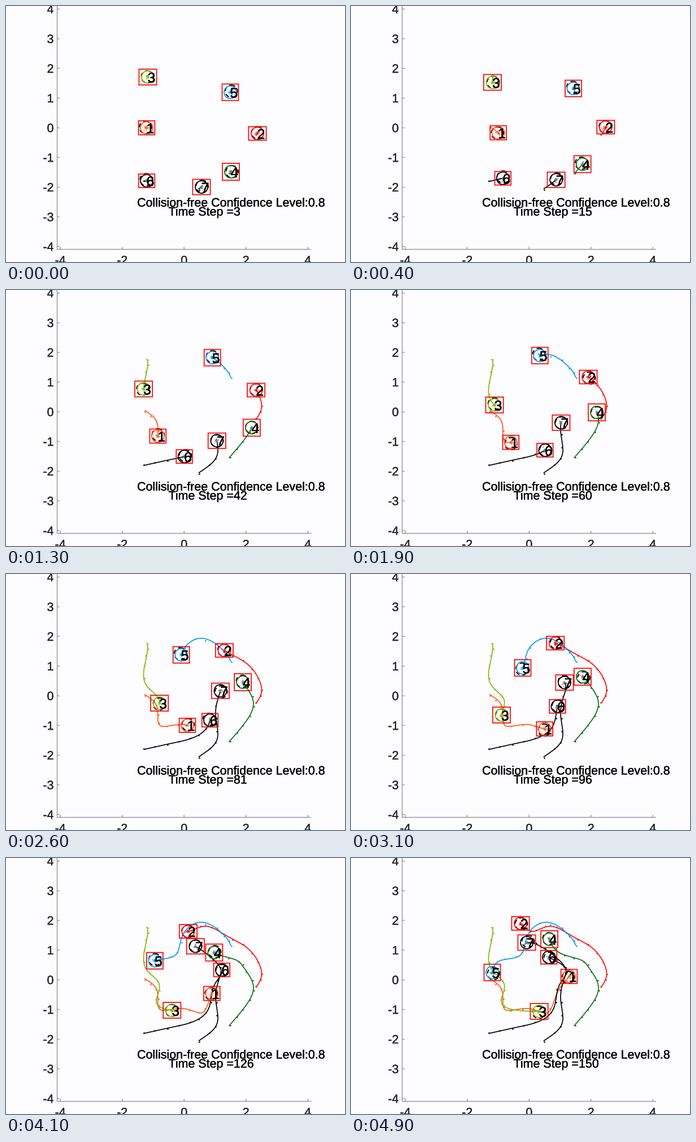
Write a matplotlib script that moves like this. It is 600 px wide and 454 px high and loops after 5 s.

```python
import numpy as np
import matplotlib.pyplot as plt
from matplotlib.animation import FuncAnimation
from matplotlib.patches import Circle, Rectangle
from matplotlib.patheffects import withStroke

W, H, DPI = 600, 454, 100
FRAMES, INTERVAL = 50, 100
PX = 72 / DPI
ORIGIN, UNIT = (315.2, 216), (54.75, 52.65)

plt.rcParams["font.family"] = "Liberation Sans"
plt.rcParams["text.hinting"] = "none"
fig = plt.figure(figsize=(W / DPI, H / DPI), dpi=DPI, facecolor="#fdfcfe")
ax = fig.add_axes([0, 0, 1, 1])
ax.set(xlim=(0, W), ylim=(H, 0))
ax.axis("off")


def write(x, y, text, size=21.45, color="black", **style):
    weight = withStroke(linewidth=0.35 * PX, foreground=color)
    return ax.text(x, y, text, fontsize=size * PX, color=color, va="baseline",
                   path_effects=[weight], **style)


def draw_axes():
    def rule(xs, ys):
        ax.plot(xs, ys, color="#777777", lw=PX, solid_capstyle="butt", snap=False)

    rule([90.5, 90.5], [0, 432])
    rule([90, 540], [431.5, 431.5])
    for v in range(-4, 5):
        y = ORIGIN[1] - UNIT[1] * v
        rule([90, 95], [y, y])
        write(84.5, y + 7.6, str(v), color="#262626", ha="right")
    for u in range(-4, 5, 2):
        x = ORIGIN[0] + UNIT[0] * u
        rule([x, x], [427, 432])
        write(x, 458, str(u), color="#262626", ha="center")


def spline_slopes(points):
    """Slopes of the natural cubic spline through evenly timed points."""
    n = len(points)
    system = 4 * np.eye(n) + np.eye(n, k=1) + np.eye(n, k=-1)
    system[0, 0] = system[-1, -1] = 2
    padded = np.pad(points, ((1, 1), (0, 0)), mode="edge")
    return np.linalg.solve(system, 3 * (padded[2:] - padded[:-2]))


class Robot:
    def __init__(self, label, color, half, route):
        self.label, self.half = label, half
        self.route = np.array(route, float)
        self.slopes = spline_slopes(self.route)

        rng = np.random.default_rng(label)
        self.dot_times = np.arange(-1, FRAMES, 4)
        self.dots = self.at(self.dot_times)
        self.dots += rng.uniform(-2.2, 2.2, self.dots.shape)

        self.trail, = ax.plot([], [], color=color, lw=1.7 * PX, zorder=2)
        dot = dict(marker="o", ls="", mew=0)
        self.marks, = ax.plot([], [], color=color, ms=2.6 * PX, zorder=2, **dot)
        core = "#777777" if color in ("black", "#0a6e12") else color
        self.cloud, = ax.plot([], [], color=core, ms=2.2 * PX, alpha=0.75, zorder=3, **dot)
        self.star, = ax.plot([], [], "*", color=core, ms=8 * PX, mew=0, zorder=3)

        outline = dict(fill=False, snap=False)
        self.estimate = Circle((0, 0), 10.8, ec="black", lw=2 * PX,
                               ls=(0, (3.6, 2.8)), zorder=4, **outline)
        self.body = Circle((0, 0), 11, ec=color, lw=1.8 * PX, zorder=4, **outline)
        self.box = Rectangle((0, 0), 2 * half[0], 2 * half[1], ec="red",
                             lw=1.7 * PX, zorder=5, **outline)
        for patch in (self.estimate, self.body, self.box):
            ax.add_patch(patch)
        self.text = write(0, 0, str(label), 25, zorder=6)

    def at(self, frames):
        last = len(self.route) - 1
        u = np.asarray(frames, float) / (FRAMES - 1) * last
        i = np.clip(u.astype(int), 0, last - 1)
        s = (u - i)[:, None]
        p, q = self.route[i], self.route[i + 1]
        m, n = self.slopes[i], self.slopes[i + 1]
        return (p + s * m + s**2 * (3 * (q - p) - 2 * m - n)
                + s**3 * (2 * (p - q) + m + n))

    def update(self, frame):
        rng = np.random.default_rng([frame, self.label])
        line = self.at(np.linspace(-1, frame, 8 * (frame + 1) + 1))
        here = line[-1]
        self.trail.set_data(*line.T)
        self.marks.set_data(*self.dots[self.dot_times <= frame].T)
        self.cloud.set_data(*(here + rng.normal(0, 2, (9, 2))).T)
        self.star.set_data(*here[:, None])
        self.body.center = here
        self.estimate.center = here + rng.uniform(-2.4, 2.4, 2)
        self.box.set_xy(here - self.half)
        self.text.set_position(here + (-0.5, 9.7))


# Colour, half box size, and a few evenly timed stops of each robot.
robots = [Robot(label, *spec) for label, spec in enumerate([
    ("#ff5a20", (14.4, 12.5), [(249, 216), (268, 238), (273, 269), (313, 267),
                               (348, 274), (364, 241), (386, 210)]),
    ("#ff0a0a", (15.6, 12), [(445, 226), (452, 200), (431, 163), (394, 140),
                             (354, 121), (323, 130), (300, 116)]),
    ("#7fba0a", (15.6, 14), [(251, 126), (248, 150), (246, 193), (271, 223),
                             (266, 256), (293, 270), (333, 272)]),
    ("#0a6e12", (15, 15), [(398, 294), (422, 265), (438, 229), (422, 196),
                           (405, 180), (369, 168), (351, 144)]),
    ("#0a9beb", (14.5, 14.6), [(397, 153), (385, 136), (348, 114), (313, 136),
                               (300, 172), (264, 182), (250, 203)]),
    ("black", (14.3, 12), [(249, 310), (290, 301), (332, 290), (359, 266),
                           (368, 227), (382, 199), (350, 176)]),
    ("black", (15.6, 13.6), [(346, 321), (374, 292), (371, 249), (378, 212),
                             (374, 187), (336, 157), (311, 150)]),
], start=1)]

draw_axes()
write(232, 355.6, "Collision-free Confidence Level:0.8", zorder=7)
counter = write(287.5, 371.6, "", zorder=7)


def update(frame):
    for robot in robots:
        robot.update(frame)
    counter.set_text(f"Time Step ={3 * (frame + 1)}")


animation = FuncAnimation(fig, update, frames=FRAMES, interval=INTERVAL,
                          repeat=True, repeat_delay=0)
plt.show()
```
